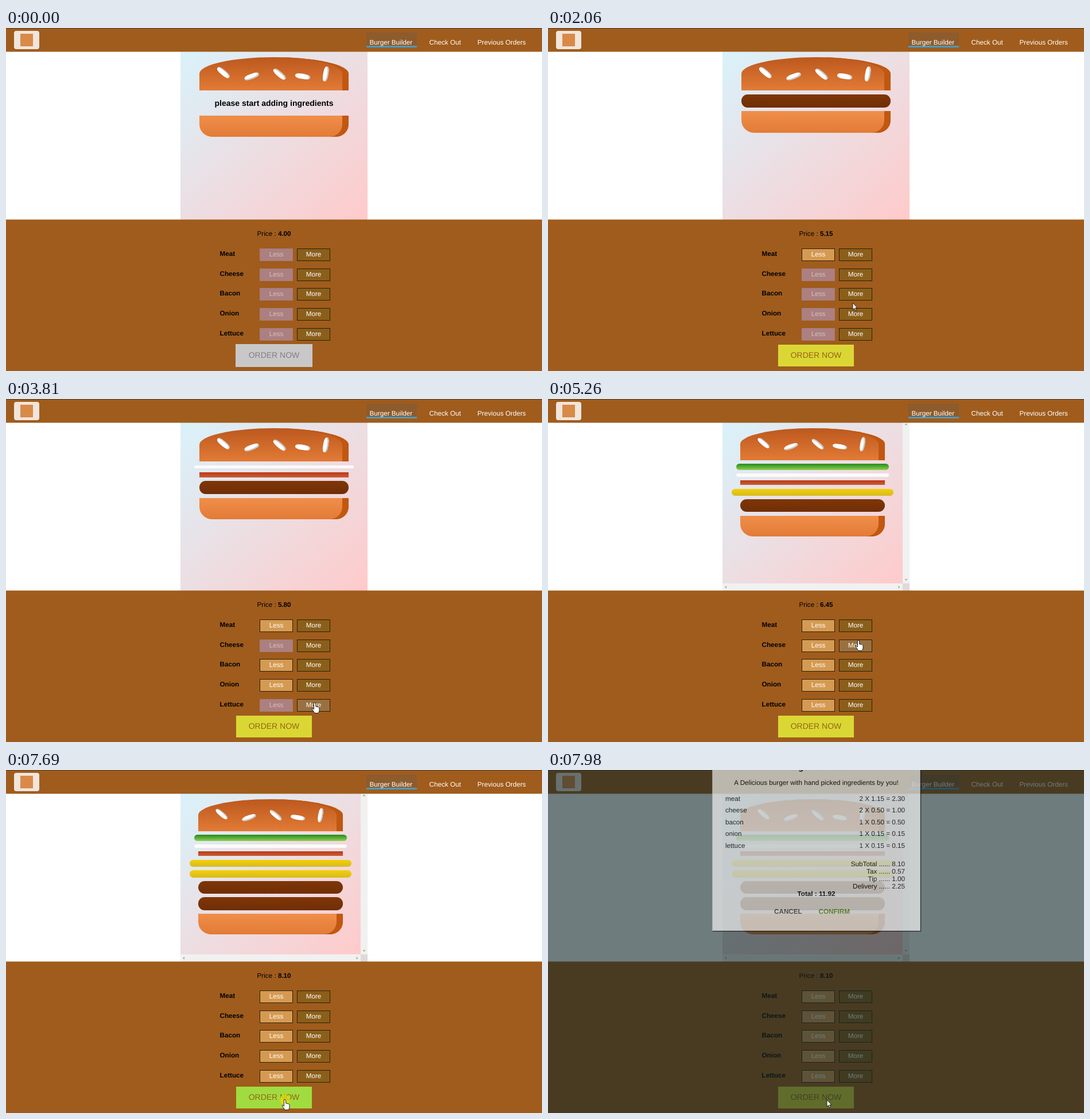
An HTML page for the animation above (8 s loop, 934 px wide and 599 px high).

```html
<!DOCTYPE html>
<html lang="en">
<head>
<meta charset="utf-8">
<title>Burger Builder</title>
<style>
html, body { margin: 0; width: 100%; height: 100%; overflow: hidden; background: #fff; }
body { position: relative; font: 11.7px/20px "Liberation Sans", Arial, sans-serif; text-rendering: geometricPrecision; }
div, svg { position: absolute; box-sizing: border-box; white-space: nowrap; }
svg { left: 0; top: 0; overflow: visible; }
.bar { left: 0; width: 934px; background: #a05c1c; background-clip: padding-box; }
.nav { color: #fff; top: 16px; }
.btn { width: 58px; height: 22px; line-height: 20px; text-align: center; color: #fff; border: 1px solid #2b2109; }
.less { left: 442px; background: #d59a52; }
.less.off { background: #ac8080; border-color: #a37c80; color: #d5bfbf; }
.more { left: 507px; background: #8b5e1a; }
.more.hot { background: #9a7040; }
#order { left: 401px; top: 553px; width: 132px; height: 38px; font-size: 14px; line-height: 37px; text-align: center; background: #dad735; color: #966515; }
#order.off { left: 400px; top: 552px; width: 134px; height: 40px; line-height: 39px; background: #c8c8c8; color: #8a7a88; }
#order.hot { background: #a0dc40; }

#panel { left: 304px; top: 41px; overflow: hidden; background: linear-gradient(to bottom right, #d9f2fb, #ffcaca); }
#stack { left: 0; top: 10px; }
#stack > div { position: relative; margin: 0 auto 2%; width: 80%; }
#stack .top { height: 20%; background: linear-gradient(#bc581e, #e27b36); border-radius: 50% 50% 0 0; box-shadow: inset -11px 0 #c15711; }
#stack .bottom { height: 13%; background: linear-gradient(#f08e4a, #e27b36); border-radius: 0 0 22px 22px; box-shadow: inset -11px 0 #c15711; }
#stack .meat { height: 8%; background: linear-gradient(#7f3608, #702e05); border-radius: 11px; }
#stack .cheese { height: 4.5%; width: 90%; background: linear-gradient(#f4d004, #d6bb22); border-radius: 15px; }
#stack .bacon { height: 3%; background: linear-gradient(#bf3813, #c45e38); }
#stack .onion { height: 2%; width: 85%; background: #fdfafa; border-radius: 15px; }
#stack .lettuce { height: 4%; width: 85%; background: linear-gradient(#228c1d, #91ce50); border-radius: 15px; }
#stack .empty { height: 30.5px; line-height: 30.5px; text-align: center; font-size: 14px; font-weight: bold; }
.seed, .seed::before, .seed::after { position: absolute; background: #fff; border-radius: 40%; }
.seed { width: 10%; height: 15%; top: 50%; }
.seed::before, .seed::after { width: 100%; height: 100%; }
.s1 { left: 30%; transform: rotate(-20deg); box-shadow: inset -1.5px -2.2px #c9c9c9; }
.s1::after { content: ""; left: -170%; top: -260%; transform: rotate(60deg); box-shadow: inset -.7px 1.5px #c9c9c9; }
.s1::before { content: ""; left: 180%; top: 145%; transform: rotate(60deg); box-shadow: inset -.7px 2.2px #c9c9c9; }
.s2 { left: 64%; transform: rotate(10deg); box-shadow: inset -2.2px 0 #c9c9c9; }
.s2::before { content: ""; left: 150%; top: -130%; transform: rotate(90deg); box-shadow: inset .7px 2.2px #c9c9c9; }

#backdrop { inset: 0; background: rgba(16, 38, 39, .6); }
#modal { left: 286px; width: 363px; height: 315px; background: #fff; border: 1px solid #ccc; box-shadow: 1px 1px 1px #000; }
.mid { left: 0; width: 100%; text-align: center; }
#ring { left: -9px; top: -9px; width: 18px; height: 18px; border-radius: 50%; background: rgba(240, 225, 0, .65); }
#cursor { left: 0; top: 0; }
#cursor path { fill: #fff; stroke: #111; stroke-width: .9; }
</style>
</head>
<body>
<div id="scroll" style="left:304px;top:41px;width:326px;height:294px;background:#f1f1f1">
  <div style="left:314px;top:281px;width:12px;height:13px;background:#dfd9d9"></div>
  <svg width="1" height="1" fill="#9fb287"><path d="M317.5 4.5h5l-2.5-3zM317.5 273.5h5l-2.5 3zM7 285v5l-3-2.5zM306.5 285v5l3-2.5z"/></svg>
</div>
<div id="panel"><div id="stack"></div></div>

<div class="bar" style="top:0;height:42px;border-top:1px solid #553c25;border-bottom:1px solid rgba(160,92,28,.5)"></div>
<div style="left:14px;top:5px;width:44px;height:32px;border-radius:4px;background:#f1e5dc"></div>
<div style="left:25px;top:10px;width:22px;height:22px;background:#d98a48"></div>
<div style="left:628px;top:8px;width:88px;height:26px;background:#8d5b2c;border-bottom:3px solid #4a9bc4"></div>
<div class="nav" style="left:633.5px">Burger Builder</div>
<div class="nav" style="left:737.5px">Check Out</div>
<div class="nav" style="left:821.5px">Previous Orders</div>

<div class="bar" style="top:334px;height:265px;border-top:1px solid rgba(160,92,28,.5)"></div>
<div style="left:437.5px;top:350px">Price : <b id="price"></b></div>
<div id="rows" style="left:0;top:0"></div>
<div id="order">ORDER NOW</div>
<div id="backdrop"></div>
<div id="modal"></div>
<div id="cursor">
  <div id="ring"></div>
  <svg width="1" height="1"><path id="pointer"/></svg>
</div>

<script>
const LOOP = 8000, OPEN = 7840;
const $ = id => document.getElementById(id);
const PRICES = { meat: 1.15, cheese: .5, bacon: .5, onion: .15, lettuce: .15 };
const NAMES = Object.keys(PRICES);
const rowY = i => Math.round(384.75 + 34.8 * i);

// Mouse moves: start, end, number of steps, target x, y
const MOVES = [
  [370, 580, 4, 505, 422], [840, 1310, 7, 535, 397], [1680, 2060, 6, 531, 480],
  [2320, 2470, 3, 535, 462], [2860, 3160, 5, 537, 501], [3630, 3810, 3, 538, 531],
  [4190, 4500, 5, 541, 422], [5340, 5500, 3, 536, 396], [5730, 5900, 3, 540, 421],
  [6280, 6440, 3, 529, 515], [6512, 6590, 2, 486, 576]
];
// Clicks: press, effect, ingredient
const CLICKS = [
  [1530, 1610, "meat"], [2630, 2780, "bacon"], [3320, 3400, "onion"], [4030, 4110, "lettuce"],
  [4580, 4750, "cheese"], [5650, 5730, "meat"], [6050, 6120, "cheese"], [7690, OPEN]
];
const ARROW = "M0 0V12L2.7 9.5 4.6 14 6.4 13.2 4.5 8.9H8.2Z";
const HAND = "M-1.6 1Q-1.6-.6 0-.6T1.6 1V6L6.5 7Q8 7.4 8 9V13Q7.5 16 6 17.5H0L-4.5 11Q-5.2 9.5-3.5 9.4L-1.6 11Z";

$("rows").innerHTML = NAMES.map((name, i) => {
  const top = `top:${rowY(i)}px`;
  return `<div style="left:372.5px;${top}"><b>${name[0].toUpperCase() + name.slice(1)}</b></div>
    <div class="btn less" style="${top}">Less</div><div class="btn more" style="${top}">More</div>`;
}).join("");
const lessButtons = document.querySelectorAll(".less");
const moreButtons = document.querySelectorAll(".more");

function buildModal() {
  const line = (y, css, text, cls = "") => `<div class="${cls}" style="top:${y}px;${css}">${text}</div>`;
  const right = "right:26px";
  const count = { meat: 2, cheese: 2, bacon: 1, onion: 1, lettuce: 1 };
  let html = line(18, "font-size:14px", "<b>Burger Contents</b>", "mid")
    + line(46, "", "A Delicious burger with hand picked ingredients by you!", "mid");
  NAMES.forEach((name, i) => {
    const n = count[name], y = 74 + 20.4 * i;
    html += line(y, "left:22px", name)
      + line(y, right, `${n} X ${PRICES[name].toFixed(2)} = ${(n * PRICES[name]).toFixed(2)}`);
  });
  ["SubTotal ...... 8.10", "Tax ...... 0.57", "Tip ...... 1.00", "Delivery ...... 2.25"]
    .forEach((text, i) => html += line(187.5 + 13.1 * i, right, text));
  html += line(240, "", "<b>Total : 11.92</b>", "mid")
    + line(271, "left:107px;color:#4a4236", "<b>CANCEL</b>")
    + line(271, "left:184.5px;color:#5c9210", "<b>CONFIRM</b>");
  $("modal").innerHTML = html;
}

function cursorAt(t) {
  let x = 921, y = 631;
  for (const [start, end, steps, tx, ty] of MOVES) {
    if (t < start) break;
    const step = Math.floor((t - start) / (end - start) * (steps - 1) + 1e-6);
    const p = Math.min(1, (step + 1) / steps);
    x += (tx - x) * p;
    y += (ty - y) * p;
  }
  return [x, y];
}

let shown = null;
function drawBurger(count, scroll) {
  const layers = ["lettuce", "onion", "bacon", "cheese", "meat"].flatMap(name => Array(count[name]).fill(name));
  const key = layers.join();
  if (key === shown) return;
  shown = key;
  const [w, h, stackH] = scroll ? [314, 281, 277.5] : [326, 294, 290];
  const size = (el, width, height) => { el.style.width = width + "px"; el.style.height = height + "px"; };
  size($("panel"), w, h);
  size($("stack"), w, stackH);
  const filling = layers.map(name => `<div class="${name}"></div>`).join("")
    || '<div class="empty">please start adding ingredients</div>';
  $("stack").innerHTML = '<div class="top"><div class="seed s1"></div><div class="seed s2"></div></div>'
    + filling + '<div class="bottom"></div>';
}

function render(t) {
  const count = Object.fromEntries(NAMES.map(name => [name, 0]));
  let price = 4;
  for (const [, at, name] of CLICKS) if (name && t >= at) {
    count[name]++;
    price += PRICES[name];
  }
  const [x, y] = cursorAt(t), open = t >= OPEN;
  const inside = (l, top, w, h) => !open && x >= l && x < l + w && y >= top && y < top + h;
  const show = (id, on) => $(id).style.display = on ? "" : "none";

  let hand = false;
  NAMES.forEach((name, i) => {
    const hot = inside(507, rowY(i), 58, 22);
    hand ||= hot;
    moreButtons[i].classList.toggle("hot", hot);
    lessButtons[i].classList.toggle("off", !count[name]);
  });
  const ready = price > 4, hotOrder = ready && inside(401, 553, 132, 38);
  hand ||= hotOrder;
  $("order").className = !ready ? "off" : hotOrder ? "hot" : "";
  $("price").textContent = price.toFixed(2);

  const scroll = count.lettuce > 0;
  show("scroll", scroll);
  drawBurger(count, scroll);

  $("cursor").style.transform = `translate(${x}px,${y}px)`;
  $("pointer").setAttribute("d", hand ? HAND : ARROW);
  show("ring", CLICKS.some(([press, at]) => t >= press && t < at));

  // The dialog drops in with an ease-out while it fades in
  const p = 1 - (1 - Math.max(0, Math.floor((t - OPEN) / 70)) * 70 / 300) ** 1.58;
  show("backdrop", open);
  show("modal", open);
  $("modal").style.top = Math.round(-34 + (p - .63) * 599) + "px";
  $("modal").style.opacity = p;
}

function frame() {
  render(performance.now() % LOOP);
  requestAnimationFrame(frame);
}
buildModal();
frame();
</script>
</body>
</html>
```
